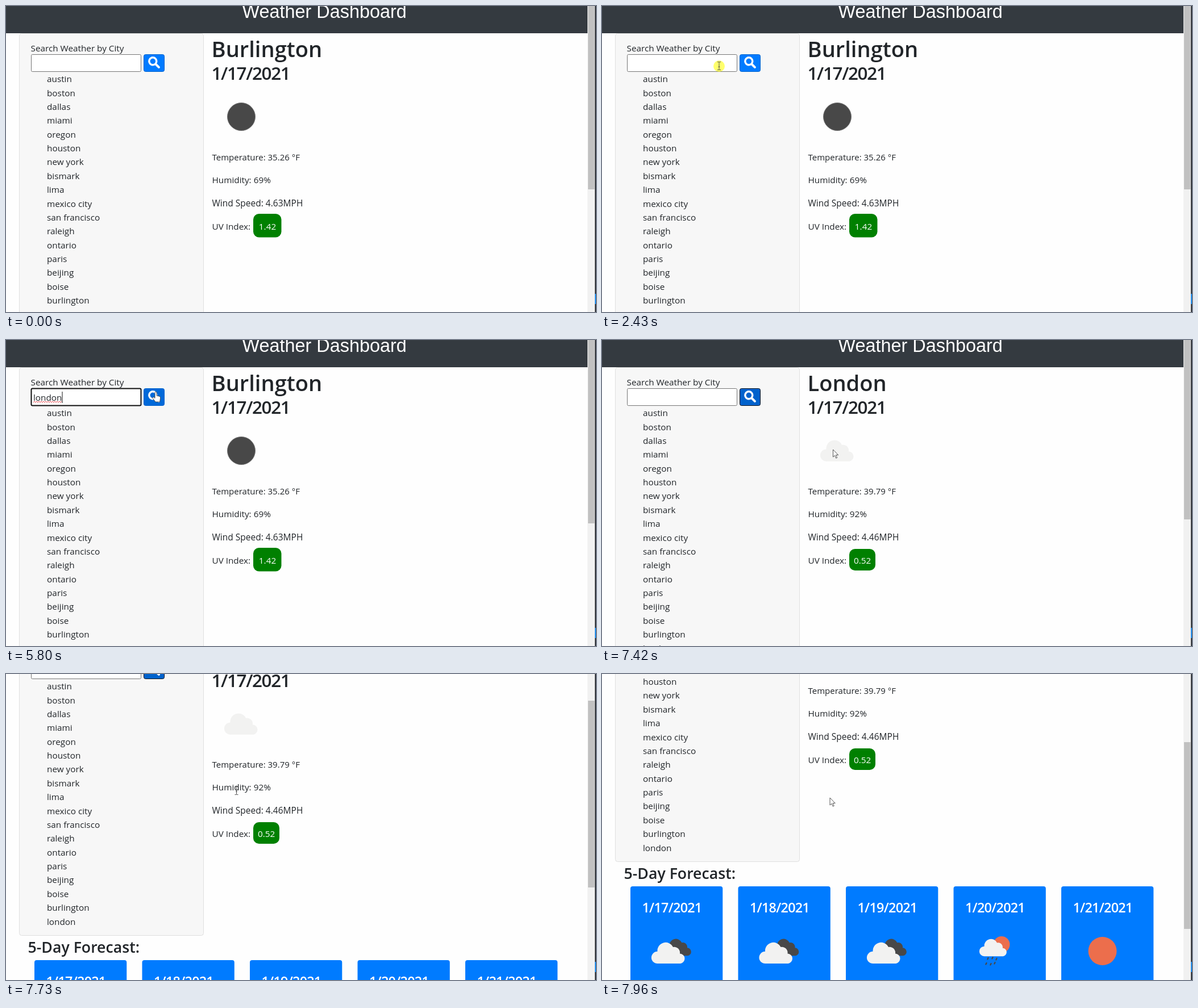
An HTML page for the animation above (8000 ms loop, 1038x539 px).

```html
<!DOCTYPE html>
<html lang="en">
<head>
<meta charset="utf-8">
<title>Weather Dashboard</title>
<style>
  html, body { margin: 0; width: 100%; height: 100%; overflow: hidden; background: #fefefe; }
  svg { display: block; width: 1038px; height: 539px; }
  text { font: 15.3px "Open Sans", "Noto Sans", sans-serif; fill: #212529; white-space: pre; }
  text.head { font-weight: 600; }
  text.city { font-size: 38.1px; }
  text.date { font-size: 31.5px; letter-spacing: -1.4px; }
  text.title { font-size: 26.7px; }
  text.day { font-size: 23.4px; letter-spacing: -.75px; fill: #fff; }
  text.temp { font-size: 15px; }
  text.wind { font-size: 15.5px; }
  text.banner { font: 32.4px "Liberation Sans", Arial, sans-serif; fill: #fff; }
  text.badge { fill: #fff; text-anchor: middle; }
</style>
</head>
<body>
<svg viewBox="0 0 1038 539">
  <defs>
    <path id="cloud" d="M-19.5 18.5a10.6 10.6 0 0 1 0-21.2a14.5 14.5 0 0 1 27.5-7.7a10 10 0 0 1 12 11.4a8.8 8.8 0 0 1 1 17.5z"/>
  </defs>
  <g id="page"></g>
  <rect x="1023" width="13" height="539" fill="#f1f1f1"/>
  <rect id="thumb" x="1024" width="11.5" fill="#c1c1c1"/>
  <rect x="1036" width="2" height="539" fill="#33373c"/>
  <rect x="1036" y="507" width="2" height="18" fill="#1e88e5"/>
  <g id="mouse">
    <circle id="glow" r="10" fill="#ff0" fill-opacity=".58"/>
    <path id="pointer" fill="#fff" stroke="#444" stroke-width=".9" stroke-linejoin="round"/>
  </g>
</svg>
<script>
const $ = id => document.getElementById(id);
const set = (id, attrs) => { for (const k in attrs) $(id).setAttribute(k, attrs[k]); };
const show = (id, on) => set(id, { visibility: on ? 'visible' : 'hidden' });

const text = (x, y, str, cls = '', id = '') =>
  `<text x="${x}" y="${y}" class="${cls}" id="${id}">${str}</text>`;
const cloud = (x, y, scale, fill) =>
  `<use href="#cloud" transform="translate(${x} ${y}) scale(${scale})" fill="${fill}"/>`;
const disc = (x, y, r, fill) => `<circle cx="${x}" cy="${y}" r="${r}" fill="${fill}"/>`;

const BLUE = '#007bff', DARK = '#484848', LIGHT = '#f2f2f1', SUN = '#ec6e4c';
const cities = ['austin', 'boston', 'dallas', 'miami', 'oregon', 'houston', 'new york', 'bismark', 'lima',
  'mexico city', 'san francisco', 'raleigh', 'ontario', 'paris', 'beijing', 'boise', 'burlington', 'london'];

const brokenClouds = cloud(134, 718.5, .8, DARK) + cloud(117, 728.5, 1, LIGHT);
const drops = [[111, 737], [119, 736], [126, 738], [108, 746], [116, 747], [123, 745]]
  .map(([x, y]) => `M${x} ${y}l-1.2 2.4`).join('');
const showers = disc(134.5, 713.5, 14.5, SUN) + cloud(120, 719, .82, LIGHT) +
  `<path d="${drops}" stroke="${DARK}" stroke-width="2.2" stroke-linecap="round"/>`;
const clear = disc(122.5, 725, 25, SUN);
const icons = [brokenClouds, brokenClouds, brokenClouds, showers, clear];

const forecast = icons.map((icon, i) => `<g transform="translate(${i * 189.5})">
  <rect x="50" y="611" width="162.3" height="260" rx="4" fill="${BLUE}"/>
  ${text(70.5, 656.8, `1/${17 + i}/2021`, 'head day')}${icon}</g>`).join('');

let wave = 'M48 110';
for (let i = 0; i < 25; i++) wave += `l2 ${i % 2 ? 2 : -2}`;

$('page').innerHTML = `
  <rect x="23.5" y="48.5" width="324" height="519" rx="4" fill="#f7f7f7" stroke="#dfdfdf"/>
  <rect width="1023" height="48" fill="#343a40"/>
  ${text(415.5, 21, 'Weather Dashboard', 'banner')}
  ${text(43.5, 79.7, 'Search Weather by City')}
  <rect id="field" x="44.5" y="85.5" width="193" height="30" rx="2" fill="#fff"/>
  ${text(48, 106.8, '', '', 'query')}
  <path id="wave" d="${wave}" fill="none" stroke="#e8484d"/>
  <rect id="caret" y="91" width="1" height="20" fill="#111"/>
  <rect id="button" x="242.5" y="85.5" width="36" height="30" rx="3"/>
  <g fill="none" stroke="#fff" stroke-width="3.4" stroke-linecap="round">
    <circle cx="258.3" cy="97.3" r="6.5"/><path d="M263.5 102.5l5.4 5.4" stroke-width="4"/>
  </g>
  ${cities.map((c, i) => text(72, 134.2 + i * 24.375, c, '', c)).join('')}
  ${text(361.5, 89.8, '', 'head city', 'city')}
  ${text(361.5, 130, '1/17/2021', 'head date')}
  <circle id="night" cx="414" cy="195" r="24.5" fill="${DARK}" stroke="#777"/>
  <g id="overcast">${cloud(414, 195.2, 1, LIGHT)}</g>
  ${text(362.5, 271.8, '', 'temp', 'temp')}
  ${text(362.5, 312.4, '', '', 'humidity')}
  ${text(362.5, 353, '', 'wind', 'wind')}
  ${text(362.5, 393.6, 'UV Index:')}
  <rect id="badge" x="435" rx="10" fill="green"/>
  ${text(460, 393.6, '', 'badge', 'uv')}
  ${text(38.5, 598, '5-Day Forecast:', 'head title')}
  ${forecast}`;

const shapes = {
  arrow: 'M0 0V13L3 10.4L5.2 15.2L7.2 14.3L5 9.6H9.2Z',
  beam: 'M-3-7.5h2.5l.5 .5l.5-.5h2.5M0-7V6M-3 6.5h2.5l.5-.5l.5 .5h2.5M-1.5 1h3',
  hand: 'M0 1q1.5-2 3 0v6l5 1.2q2 .6 1.6 3l-1 6.8h-7.6l-5-6.5q-.5-2 1.5-2l2.5 2z'
};

// Each key: time, then the values at that time.
const path = [[440, 1022, 525], [600, 820, 420], [830, 470, 310], [1060, 230, 260], [1130, 196, 254],
  [1210, 197, 268], [1290, 215, 230], [1440, 248, 150], [1600, 234, 78], [1680, 225, 56],
  [1830, 190, 92], [2050, 206, 106], [2510, 206, 106], [2740, 348.5, 43], [5390, 348.5, 43],
  [5720, 262, 91], [6510, 262, 91], [6720, 452, 376], [6890, 452, 376], [7340, 406.5, 193],
  [7570, 406.5, 193], [7725, 405.5, 206], [7957, 401, 218]];
const scrollKeys = [[7500, 0], [7570, 10], [7648, 58], [7725, 107], [7803, 152], [7880, 203], [7957, 237]];
const typed = [3290, 3450, 3680, 4010, 4230, 4470];

function at(keys, t) {
  const i = keys.findIndex(k => k[0] > t);
  if (i < 0) return keys[keys.length - 1].slice(1);
  if (!i) return keys[0].slice(1);
  const a = keys[i - 1], b = keys[i], u = (t - a[0]) / (b[0] - a[0]);
  return a.slice(1).map((v, j) => v + (b[j + 1] - v) * u);
}

function draw(t) {
  const within = (a, b) => t >= a && t < b;
  const tick = 440 + 77.5 * Math.floor((t - 420) / 77.5);
  const [x, y] = at(path, tick), scroll = Math.round(at(scrollKeys, tick)[0]);
  const sent = t >= 6100, loaded = t >= 6180, details = t >= 6260;
  const focus = within(2510, 6100);

  set('page', { transform: `translate(0 ${-scroll})` });
  set('thumb', { y: Math.round(-13 + .56 * scroll), height: loaded ? 329 : 336 });

  $('query').textContent = sent ? '' : 'london'.slice(0, typed.filter(k => t >= k).length);
  set('field', { stroke: focus ? '#101010' : '#767676', 'stroke-width': focus ? 2 : 1 });
  set('caret', { x: 48 + $('query').getComputedTextLength() });
  show('caret', within(2510, 2980) || within(3290, 5020) || within(5500, 6100));
  show('wave', within(5500, 6100));

  const overButton = x > 242 && x < 279 && y > 85 && y < 116;
  const overText = x > 44 && x < 238 && y > 85 && y < 116 || within(7650, 7800);
  set('button', {
    fill: sent ? '#0062cc' : overButton ? '#0069d9' : BLUE,
    stroke: sent ? '#10151c' : '#0062cc'
  });

  show('london', loaded);
  $('city').textContent = loaded ? 'London' : 'Burlington';
  show('night', !details);
  show('overcast', details);
  $('temp').textContent = `Temperature: ${details ? '39.79' : '35.26'} °F`;
  $('humidity').textContent = `Humidity: ${details ? 92 : 69}%`;
  $('wind').textContent = `Wind Speed: ${details ? '4.46' : '4.63'}MPH`;
  const low = t >= 6410;
  $('uv').textContent = low ? '0.52' : '1.42';
  set('uv', { x: low ? 458.2 : 460 });
  set('badge', low ? { y: 368, width: 46, height: 38 } : { y: 366, width: 49.5, height: 41.5 });

  set('mouse', { transform: `translate(${x} ${y})` });
  show('pointer', t >= 430);
  show('glow', within(2420, 2590) || within(5870, 6200));
  set('pointer', { d: shapes[overButton ? 'hand' : overText ? 'beam' : 'arrow'] });
}

const start = performance.now();
(function loop() {
  draw((performance.now() - start) % 8000);
  requestAnimationFrame(loop);
})();
</script>
</body>
</html>
```
